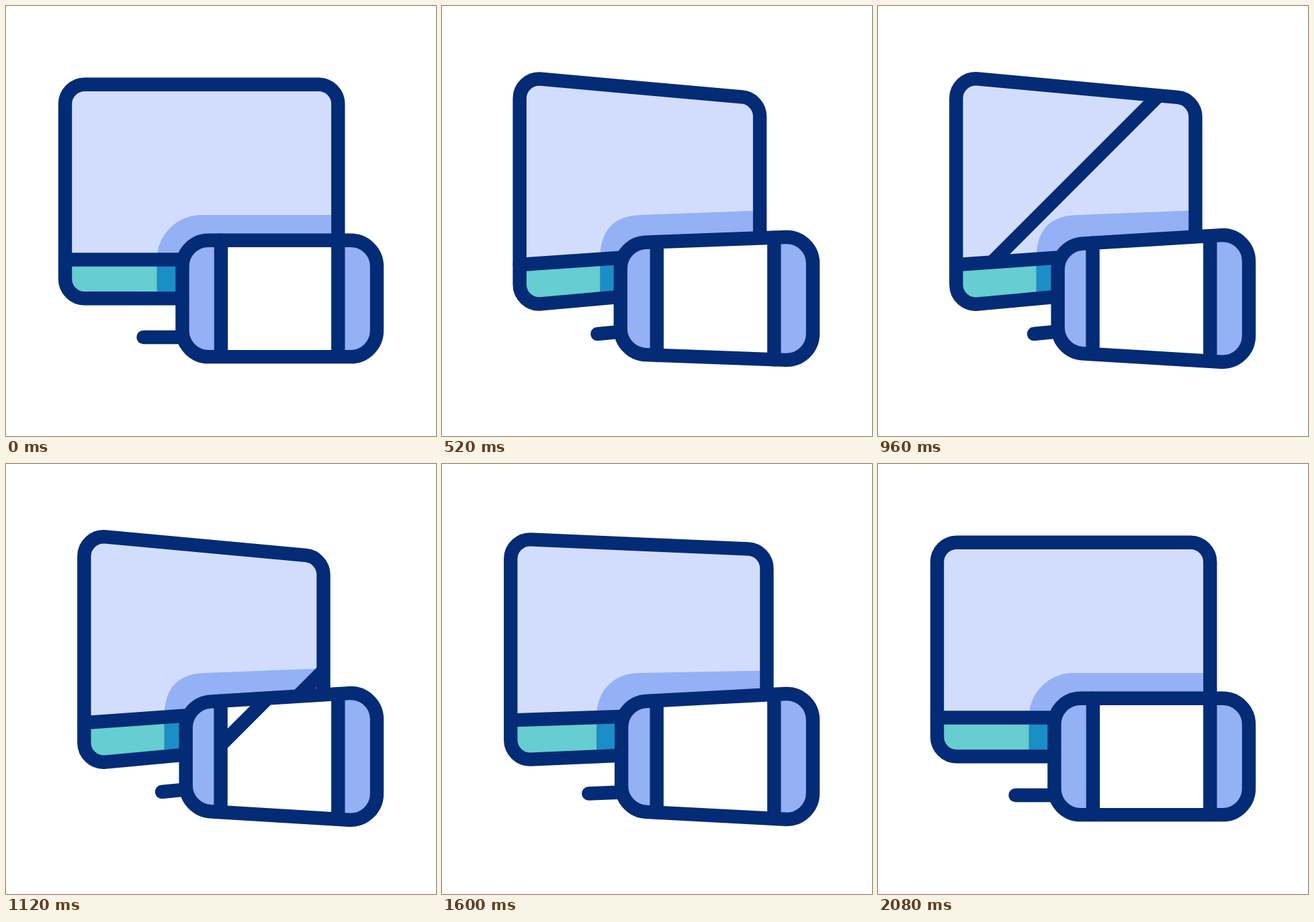
These frames come from a looping animation (640 by 640 pixels, 2.56 s). An HTML page with a canvas:

```html
<!DOCTYPE html>
<html lang="en">
<head>
<meta charset="utf-8">
<title>Devices</title>
<style>
html, body { margin: 0; width: 100%; height: 100%; overflow: hidden; background: #fff; }
canvas { display: block; width: 100vmin; height: 100vmin; }
</style>
</head>
<body>
<canvas id="stage" width="640" height="640"></canvas>
<script>
const ctx = document.getElementById('stage').getContext('2d');
const LOOP = 2560, STEP = 40, MOVE = 640, SWEEP_SPEED = 1.43;
const NAVY = '#032b76', PALE = '#d2ddfd', BLUE = '#93b1f4', TEAL = '#66cdd1', DEEP = '#1b8ec5';

const lerp = (a, b, p) => a + (b - a) * p;
const clamp = u => Math.min(1, Math.max(0, u));
const ease = (u, n) => u < 0.5 ? 0.5 * (2 * u) ** n : 1 - 0.5 * (2 - 2 * u) ** n;

// tilt amount: in from start, back out two moves later
const phase = (t, start, n) => ease(clamp((t - start) / MOVE), n);
const tilt = (t, start, n) => phase(t, start, n) - phase(t, start + 2 * MOVE, n);

// A panel is a trapezoid, symmetric about its middle height
function panel(left, right, mid, halfL, halfR) {
  const half = x => lerp(halfL, halfR, (x - left) / (right - left));
  return { left, right, top: x => mid - half(x), low: x => mid + half(x) };
}

function rounded({ left, right, top, low }, r) {
  const path = new Path2D(), cx = (left + right) / 2;
  path.moveTo(cx, top(cx));
  path.arcTo(right, top(right), right, low(right), r);
  path.arcTo(right, low(right), left, low(left), r);
  path.arcTo(left, low(left), left, top(left), r);
  path.arcTo(left, top(left), right, top(right), r);
  path.closePath();
  return path;
}

function quad(x0, x1, top, low) {
  const path = new Path2D();
  path.moveTo(x0, top(x0));
  path.lineTo(x1, top(x1));
  path.lineTo(x1, low(x1));
  path.lineTo(x0, low(x0));
  path.closePath();
  return path;
}

function fill(path, color) {
  ctx.fillStyle = color;
  ctx.fill(path);
}

function line(x0, y0, x1, y1) {
  ctx.beginPath();
  ctx.moveTo(x0, y0);
  ctx.lineTo(x1, y1);
  ctx.stroke();
}

// 45 degree bar along x + y = c, kept inside a screen
function sweep(screen, c) {
  ctx.save();
  ctx.clip(screen);
  line(c + 100, -100, c - 740, 740);
  ctx.restore();
}

// Shade that the phone casts on the monitor
function shade(p, right) {
  const x = lerp(224.5, 235.5, p), y = 377.5;
  const endX = lerp(291, 297, p), endY = 311;
  const k = lerp(0.552, 0.67, p);
  const path = new Path2D();
  path.moveTo(x, y);
  path.bezierCurveTo(x, lerp(y, endY, k), lerp(endX, x, k), lerp(endY, 312, p), endX, endY);
  path.lineTo(right, lerp(endY, 304.2, p));
  path.lineTo(right, y + 20);
  path.lineTo(x, y + 20);
  fill(path, BLUE);
  return x;
}

function drawMonitor(p, c) {
  const left = lerp(88, 116.3, p), right = lerp(494.3, 472.5, p);
  const shape = panel(left, right, 276, lerp(159.3, 170.5, p), lerp(159.3, 137.6, p));
  const body = rounded(shape, 29);
  const chinL = lerp(377.5, 385.2, p), chinR = lerp(377.5, 360, p);
  const chin = x => lerp(chinL, chinR, (x - left) / (right - left));
  const screen = quad(left, right, shape.top, chin);

  ctx.save();
  ctx.clip(body);
  fill(screen, PALE);
  const edge = shade(p, right);
  fill(quad(left, right, chin, shape.low), TEAL);
  fill(quad(edge, right, chin, shape.low), DEEP);
  sweep(screen, c);
  ctx.restore();

  line(left, chinL, right, chinR);
  ctx.stroke(body);
  line(lerp(204.5, 232, p), lerp(493, 488, p), 300, lerp(493, 481.4, p));
}

function drawPhone(p, c) {
  const shape = panel(lerp(262.5, 267.7, p), 552, 435.4, lerp(86.7, 79.6, p), lerp(86.7, 96.8, p));
  const body = rounded(shape, 39);
  const bars = [lerp(320, 319.6, p), 494.3];
  const screen = quad(...bars, shape.top, shape.low);
  fill(body, BLUE);
  fill(screen, '#fff');
  sweep(screen, c);
  ctx.stroke(body);
  for (const x of bars) line(x, shape.top(x), x, shape.low(x));
}

function draw(now) {
  const t = Math.floor((now % LOOP) / STEP) * STEP;
  ctx.fillStyle = '#fff';
  ctx.fillRect(0, 0, 640, 640);
  ctx.strokeStyle = NAVY;
  ctx.lineWidth = 20.4;
  ctx.lineCap = 'round';
  ctx.lineJoin = 'round';
  drawMonitor(tilt(t, 0, 3), 265 + (t - 760) * SWEEP_SPEED);
  drawPhone(tilt(t, 160, 2), 738 + (t - 1120) * SWEEP_SPEED);
}

const start = performance.now();
function tick() {
  draw(performance.now() - start);
  requestAnimationFrame(tick);
}
tick();
</script>
</body>
</html>
```
